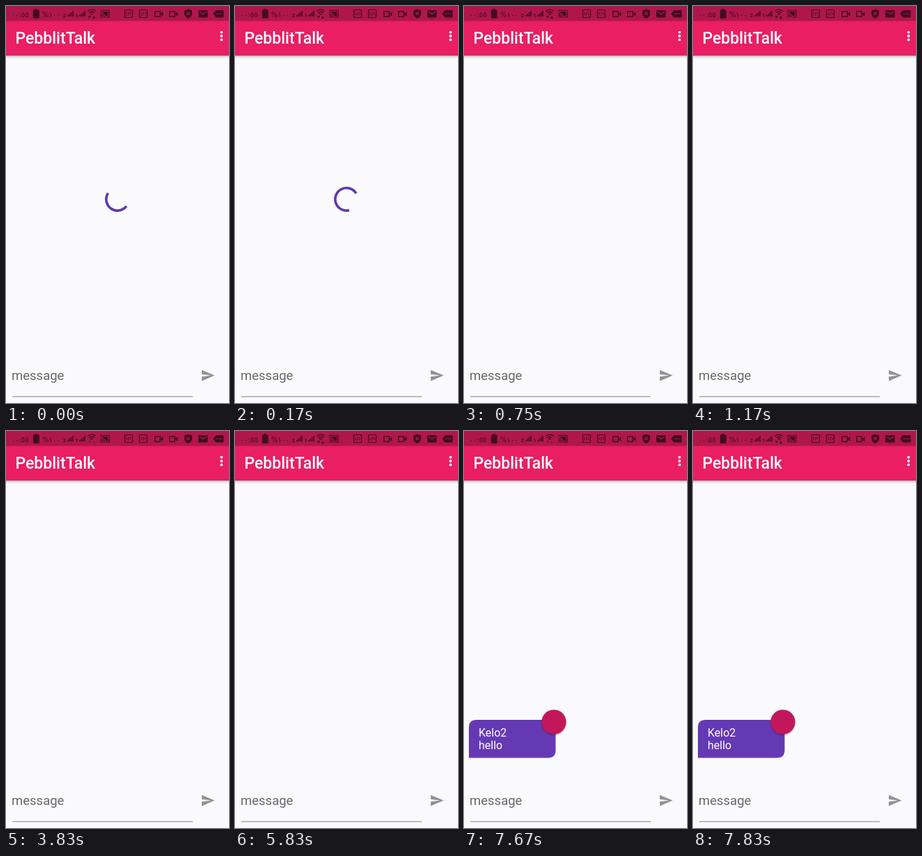
Recreate the animation shown at these times as an HTML page. Size 320 by 569 pixels, loop 8 s.

```html
<!DOCTYPE html>
<html lang="en">
<head>
<meta charset="utf-8">
<title>Chat screen</title>
<style>
  html, body { margin: 0; width: 100%; height: 100%; overflow: hidden; background: #faf9fb; }
  svg { display: block; width: 100%; height: 100%; }
  text { font-family: Roboto, "Noto Sans", sans-serif; }
  .digits text { font-family: "DejaVu Sans", sans-serif; }
  .ink { fill: #430b20; }
  .line { fill: none; stroke: #430b20; }
</style>
</head>
<body>
<svg viewBox="0 0 320 569" preserveAspectRatio="none">
  <defs>
    <linearGradient id="shade" x2="0" y2="1">
      <stop offset="0" stop-color="#000" stop-opacity=".3"/>
      <stop offset=".4" stop-color="#000" stop-opacity=".1"/>
      <stop offset="1" stop-color="#000" stop-opacity="0"/>
    </linearGradient>
    <filter id="soft" x="-30%" y="-30%" width="160%" height="160%">
      <feGaussianBlur stdDeviation="1.3"/>
    </filter>
    <g id="bars">
      <path d="M0 15v-2h1.6v2zM2.4 15v-4h1.6v4zM4.8 15V9h1.6v6zM7.2 15V7h1.6v8z"/>
    </g>
    <g id="code" class="line">
      <rect x=".5" y=".5" width="11" height="11" rx="1" stroke-width="1.2"/>
      <path d="M4 4L2.2 6 4 8M8 4l1.8 2L8 8M6.7 3.5l-1.4 5" stroke-width=".9"/>
    </g>
    <g id="video">
      <path class="line" d="M.7 .7h7.6v7.6H.7z" stroke-width="1.4" stroke-linejoin="round"/>
      <path class="ink" d="M8.5 4.5L12.3 1v7z"/>
    </g>
  </defs>

  <rect width="320" height="569" fill="#faf9fb"/>
  <rect y="71" width="320" height="5" fill="url(#shade)"/>
  <rect y="21" width="320" height="50" fill="#e91e63"/>
  <rect width="320" height="21.5" fill="#af174a"/>

  <g class="ink">
    <g class="digits" font-size="10">
      <text x="8" y="15.5">٠٠:٥٥</text>
      <text x="52" y="15.5">%١٠٠</text>
    </g>
    <path d="M41.5 4h3.2v1.4h2.3q.7 0 .7.7V17q0 .8-.7.8h-7.4q-.7 0-.7-.8V6.1q0-.7.7-.7h1.9z"/>
    <text x="82" y="15.5" font-size="7" font-weight="700">2</text>
    <use href="#bars" x="88"/>
    <text x="99.5" y="15.5" font-size="7" font-weight="700">1</text>
    <use href="#bars" x="105"/>
    <path class="line" d="M117.2 7.3q5.8-4.4 11.6 0M119.2 9.6q3.8-2.8 7.6 0M121.2 11.8q1.8-1.2 3.6 0" stroke-width="1.4"/>
    <path id="down" d="M118 14h4l-2 4z"/>
    <path id="up" d="M124 18h4l-2-4z"/>
    <path transform="translate(134.6 3.8) scale(.61)" d="M1 18v3h3c0-1.66-1.34-3-3-3zm0-4v2c2.76 0 5 2.24 5 5h2c0-3.87-3.13-7-7-7zm0-4v2c4.97 0 9 4.03 9 9h2c0-6.08-4.93-11-11-11zM5 7v1.63c3.96 1.28 7.09 4.41 8.37 8.37H19V7zM21 3H3c-1.1 0-2 .9-2 2v3h2V5h18v14h-7v2h7c1.1 0 2-.9 2-2V5c0-1.1-.9-2-2-2z"/>
    <use href="#code" x="170" y="5"/>
    <use href="#code" x="191" y="5"/>
    <use href="#video" x="213" y="7"/>
    <use href="#video" x="234" y="7"/>
    <path d="M261.5 4.5l5.5 2v4.2q0 4.6-5.5 7.3-5.5-2.7-5.5-7.3V6.500z"/>
    <path d="M259.4 8.800l4.2 4.200m0-4.200l-4.2 4.200" stroke="#af174a" stroke-width="1.3"/>
    <rect x="276" y="6" width="13.500" height="10.600" rx="1.300"/>
    <path d="M277.300 8l5.450 3.600L288.200 8" fill="none" stroke="#af174a" stroke-width="1.200"/>
    <path d="M301.500 6h9.500q1.300 0 1.300 1.300v7.900q0 1.300-1.300 1.300h-9.500L297 11.250z"/>
    <path d="M302 11.250h1.700m1.200 0h1.700m1.200 0h1.700" stroke="#af174a" stroke-width="1.700"/>
  </g>

  <text x="13.400" y="54" font-size="23" font-weight="500" fill="#fff">PebblitTalk</text>
  <g fill="#fff">
    <circle cx="309.300" cy="37.600" r="1.900"/>
    <circle cx="309.300" cy="43" r="1.900"/>
    <circle cx="309.300" cy="48.400" r="1.900"/>
  </g>

  <path id="spinner" fill="none" stroke="#5f37b4" stroke-width="3.600"/>

  <g id="bubble">
    <path d="M7 468.500V425q0-11 11-11h102.500q11 0 11 11v32.500q0 11-11 11z" fill="#6539b4"/>
    <g font-size="16" fill="#fff">
      <text x="21" y="438">Kelo2</text>
      <text x="21" y="456">hello</text>
    </g>
    <circle cx="129" cy="418.500" r="17.300" fill="#000" opacity=".35" filter="url(#soft)"/>
    <circle cx="129" cy="417" r="17.600" fill="#c2185b"/>
  </g>

  <text x="8" y="536" font-size="18.500" fill="#686769">message</text>
  <rect x="9" y="559.300" width="259" height="1.100" fill="#8e8d90"/>
  <path transform="translate(279.200 519) scale(.88)" d="M2.010 21L23 12 2.010 3 2 10l15 2-15 2z" fill="#929195"/>
</svg>

<script>
  const LOOP = 8000;
  const SPIN_STEPS = [0, 80, 160, 250, 330];
  const SPIN_END = 750;
  const BUBBLE_START = 7670;
  const el = id => document.getElementById(id);
  const spinner = el("spinner"), bubble = el("bubble"), down = el("down"), up = el("up");

  const show = (node, on) => node.setAttribute("visibility", on ? "visible" : "hidden");
  const light = (node, on) => node.setAttribute("opacity", on ? 1 : 0.3);

  function point(deg) {
    const a = deg * Math.PI / 180;
    return `${160 + 16.2 * Math.cos(a)} ${277 + 16.2 * Math.sin(a)}`;
  }

  // The tail turns steadily while the arc opens with a slowing curve.
  function arc(t) {
    const u = Math.max(...SPIN_STEPS.filter(s => s <= t)) / 330;
    const tail = 38 + 79 * u;
    const sweep = 175 + 106 * (1 - (1 - u) ** 2);
    return `M${point(tail)}A16.2 16.2 0 ${sweep > 180 ? 1 : 0} 1 ${point(tail + sweep)}`;
  }

  function draw(t) {
    show(spinner, t < SPIN_END);
    spinner.setAttribute("d", arc(t));
    show(bubble, t >= BUBBLE_START);
    const busy = t < 3830 || t >= 7830;
    light(down, busy || (t >= 4830 && t < 6830));
    light(up, busy || (t >= 5830 && t < 6830));
  }

  const start = performance.now();
  function tick() {
    draw((performance.now() - start) % LOOP);
    requestAnimationFrame(tick);
  }
  tick();
</script>
</body>
</html>
```
